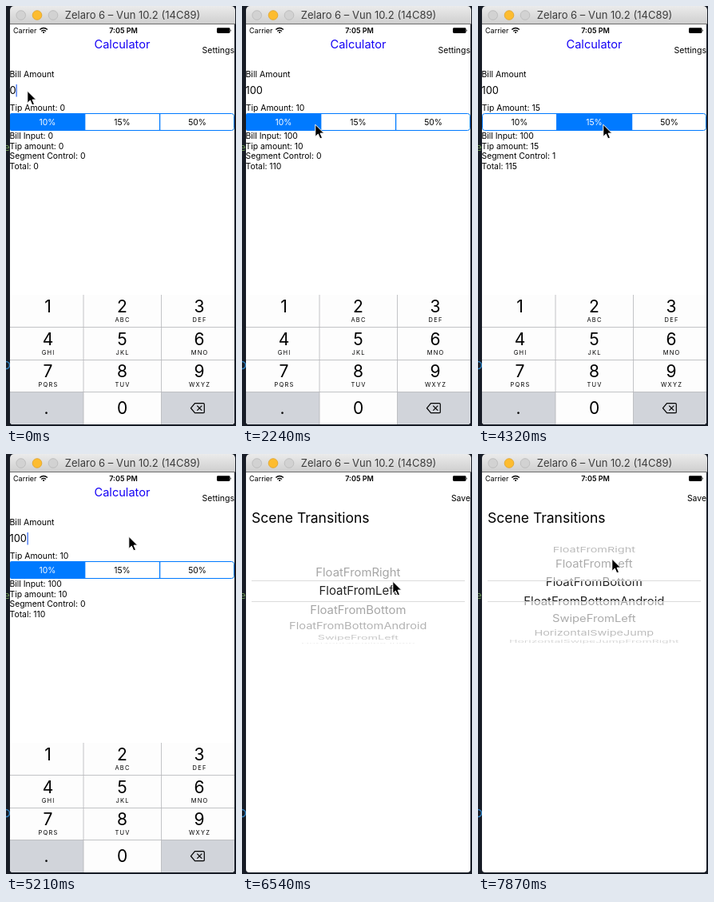
An HTML page that plays this animation: 288x525 px, repeating every 8000 ms.

```html
<!DOCTYPE html>
<html lang="en">
<head>
<meta charset="utf-8">
<title>Tip calculator</title>
<style>
html, body { margin: 0; width: 288px; height: 525px; overflow: hidden; background: #171c26; }
svg { display: block; font-family: Inter, Roboto, sans-serif; }
text { white-space: pre; }
</style>
</head>
<body>
<svg id="stage" width="288" height="525" viewBox="0 0 288 525">
  <defs>
    <linearGradient id="bar" x2="0" y2="1"><stop stop-color="#ebebeb"/><stop offset="1" stop-color="#cfcfcf"/></linearGradient>
    <clipPath id="phone"><path d="M5 22H286V519a4 4 0 0 1-4 4H9a4 4 0 0 1-4-4z"/></clipPath>
    <clipPath id="outside"><path d="M0 106H288V158H0zM0 184.5H288V237H0z"/></clipPath>
    <clipPath id="inside"><path d="M0 158H288V184.5H0z"/></clipPath>
  </defs>
  <text x="-3" y="181" font-size="13" fill="#6f9a55" font-family="DejaVu Sans Mono, monospace">e</text>
  <circle cx="0" cy="449" r="4.5" fill="none" stroke="#2f7fbd" stroke-width="1.6"/>
  <path d="M5 22V5a5 5 0 0 1 5-5H282a5 5 0 0 1 5 5V22z" fill="url(#bar)"/>
  <path d="M5 22.5H287" stroke="#6e6e6e"/>
  <g stroke-width=".8">
    <circle cx="18.7" cy="11.5" r="5.8" fill="#d2d2d2" stroke="#b7b7b7"/>
    <circle cx="39" cy="11.5" r="5.8" fill="#fdbc2f" stroke="#dfa023"/>
    <circle cx="59" cy="11.5" r="5.8" fill="#d2d2d2" stroke="#b7b7b7"/>
  </g>
  <text x="158.5" y="16.2" font-size="13" fill="#3c3c3c" text-anchor="middle">Zelaro 6 – Vun 10.2 (14C89)</text>
  <g clip-path="url(#phone)">
    <path d="M5 23H286V523H5z" fill="#fff"/>
    <g id="screen"></g>
    <text x="9" y="33.5" font-size="9">Carrier</text>
    <path d="M42.3 29.6q4.8-4.2 9.6 0M44.2 31.6q2.9-2.5 5.8 0" fill="none" stroke="#000" stroke-width="1.3"/>
    <circle cx="47.1" cy="33" r="1.1"/>
    <text x="147" y="33.5" font-size="9" font-weight="600" text-anchor="middle">7:05 PM</text>
    <rect x="264" y="27.3" width="16.5" height="6.6" rx="1.4"/>
    <path d="M281.2 29.3q1.6 1.3 0 2.6z"/>
    <g id="keys"></g>
  </g>
  <path id="cursor" d="M0 0V15.2l3.5-3.3 2.5 5.7 2.7-1.1-2.5-5.6h4.7z" stroke="#fff"/>
</svg>
<script>
const LOOP = 8000, STEP = 148.4;
const ROWS = ["FloatFromRight", "FloatFromLeft", "FloatFromBottom", "FloatFromBottomAndroid",
  "SwipeFromLeft", "HorizontalSwipeJump", "HorizontalSwipeJumpFromRight"];
const RATES = [10, 15, 50];
const EDGES = [5, 98.7, 192.6, 286];
// pointer path: step, x, y
const PATH = [[0, 27, 106], [1, 28, 107], [12, 28, 107], [13, 42, 119], [14, 75, 140], [15, 92, 148],
  [18, 150, 149], [19, 158, 149], [22, 232, 149], [24, 236, 149], [25, 236, 149], [28, 172, 148],
  [29, 157, 148], [32, 65, 149], [33, 62, 149], [36, 200, 80], [38, 260, 59], [39, 262, 58],
  [41, 262, 61], [42, 218, 97], [43, 218, 97], [44, 189, 159], [45, 186, 147], [48, 180, 55],
  [50, 176, 98.5], [51, 173, 114], [53, 168, 131]];
const $ = id => document.getElementById(id);
const clamp = v => Math.max(0, Math.min(1, v));

function text(x, y, size, str, attrs = "") {
  return `<text x="${x}" y="${y}" font-size="${size}" ${attrs}>${str}</text>`;
}
const centred = (x, y, size, str, attrs = "") => text(x, y, size, str, `text-anchor="middle" ${attrs}`);

function pointer(n) {
  const i = PATH.findIndex(p => p[0] >= n);
  if (i < 1) return PATH[i ? PATH.length - 1 : 0].slice(1);
  const [a, ax, ay] = PATH[i - 1], [b, bx, by] = PATH[i], k = (n - a) / (b - a);
  return [ax + (bx - ax) * k, ay + (by - ay) * k];
}

function keypad() {
  const subs = ["", "ABC", "DEF", "GHI", "JKL", "MNO", "PQRS", "TUV", "WXYZ"];
  let out = `<path d="M5 361H286V523H5z" fill="#fdfdfd"/>
    <path d="M5 482.5H97V523H5zM194.5 482.5H286V523H194.5z" fill="#d1d4da"/>
    <path d="M97 361V523M194.5 361V523M5 401.5H286M5 442.5H286M5 482.5H286" stroke="#b4b5b9" stroke-width=".8"/>`;
  subs.forEach((s, i) => {
    const x = [52.5, 145.5, 242][i % 3], y = 361 + 40.6 * (i / 3 | 0);
    out += centred(x, y + 22.2, 21, i + 1) + centred(x + .6, y + 34, 7.5, s, 'letter-spacing="1.2"');
  });
  return out + centred(145.5, 510.2, 21, 0) + centred(50.5, 510, 21, ".") +
    `<path d="M231.5 502.7l5-6H247a1.3 1.3 0 0 1 1.3 1.3v9.4a1.3 1.3 0 0 1-1.3 1.3H236.5z
      M239.3 499.7l6 6M245.3 499.7l-6 6" fill="none" stroke="#000" stroke-width="1.2"/>`;
}

function segments(selected) {
  const [l, r] = EDGES.slice(selected);
  return `<rect x="5.5" y="134.5" width="280" height="21" rx="3" fill="#fff" stroke="#007aff"/>
    <path d="M98.7 134V156M192.6 134V156" stroke="#007aff" stroke-width="1.3"/>
    <rect x="${l}" y="134" width="${r - l}" height="22" rx="${selected === 1 ? 0 : 2}" fill="#007aff"/>` +
    RATES.map((p, i) => centred([52, 145.5, 239.5][i], 148.8, 10.3, p + "%",
      `fill="${i === selected ? "#fff" : "#000"}"`)).join("");
}

function calculator(n) {
  const entry = n < 4 ? "0" : n < 5 ? "" : n < 7 ? "1" : n < 9 ? "10" : "100";
  const seg = n < 18 ? 0 : n < 23 ? 1 : n < 28 ? 2 : n < 32 ? 1 : 0;
  const bill = +entry, tip = bill * RATES[seg] / 100;
  const caretOn = n < 2 || n > 3 && n < 13 || n > 17 && (n * STEP + 300) % 1000 < 500;
  const caretX = entry === "0" ? 12.5 : [5, 10, 18, 26.5][entry.length];
  const info = [`Bill Input: ${bill}`, `Tip amount: ${tip}`, `Segment Control: ${seg}`, `Total: ${bill + tip}`];
  return centred(145.5, 52.5, 14.6, "Calculator", 'fill="#1400f5"') +
    text(4.5, 88.8, 10.5, "Bill Amount") + text(4.5, 110.2, 12.8, entry) +
    (caretOn ? `<rect x="${caretX}" y="98" width="1.3" height="15.5" fill="#3b6ef0"/>` : "") +
    text(4.8, 131.3, 10.4, `Tip Amount: ${tip}`) + segments(seg) +
    info.map((s, i) => text(4.5, 165.8 + 12.7 * i, 10.4, s)).join("");
}

// rows sit on a cylinder, one every 20.6 degrees
function wheel(offset) {
  const rows = dark => ROWS.map((name, i) => {
    const a = (i - offset) * 20.6 * Math.PI / 180, c = Math.cos(a);
    if (Math.abs(a) > 1.5) return "";
    const place = `translate(145.3 ${171 + 66.8 * Math.sin(a)}) scale(${1 - .09 * (1 - c)} ${c})`;
    return centred(0, 5.4, 14.95, name, `transform="${place}" ` +
      (dark ? 'fill="#222"' : `opacity="${.37 * c ** .7}"`));
  }).join("");
  return `<g clip-path="url(#outside)">${rows(false)}</g><g clip-path="url(#inside)">${rows(true)}</g>
    <path d="M12 158.5H279M12 184.5H279" stroke="#dcdcdc"/>`;
}

function draw(n) {
  const [x, y] = pointer(n);
  const u = clamp((n - 37) / 3.43), slide = 1 - (1 - u) ** 2;
  let offset = n < 44 ? clamp((n - 37.5) * .41) : 1 + (159 - y) / 19;
  if (offset > 6) offset = 6 + (offset - 6) * .4;

  let out = "";
  if (u < 1) {
    const s = 1 - .052 * slide;
    out += `<g opacity="${1 - u ** 1.25}" transform="translate(145.5 268) scale(${s}) translate(-145.5 -268)">${calculator(n)}</g>`;
  }
  if (u > 0) {
    out += `<g transform="translate(${-281 * (1 - slide)})">` +
      text(12, 85.7, 17.5, "Scene Transitions") + wheel(offset) + "</g>";
  }
  const right = 'text-anchor="end"';
  out += `<g opacity="${1 - slide}">${text(286, 59.3, 10.5, "Settings", right)}</g>
    <g opacity="${slide}"><path d="M262 49H286V63H262z" fill="#fff"/>${text(286, 59.3, 10.4, "Save", right)}</g>`;
  $("screen").innerHTML = out;
  $("keys").style.display = n < 44 ? "" : "none";
  $("cursor").setAttribute("transform", `translate(${x - .2} ${y + .2})`);
}

$("keys").innerHTML = keypad();
let last = -1;
function tick() {
  const n = Math.floor(performance.now() % LOOP / STEP);
  if (n !== last) draw(last = n);
  requestAnimationFrame(tick);
}
tick();
</script>
</body>
</html>
```
